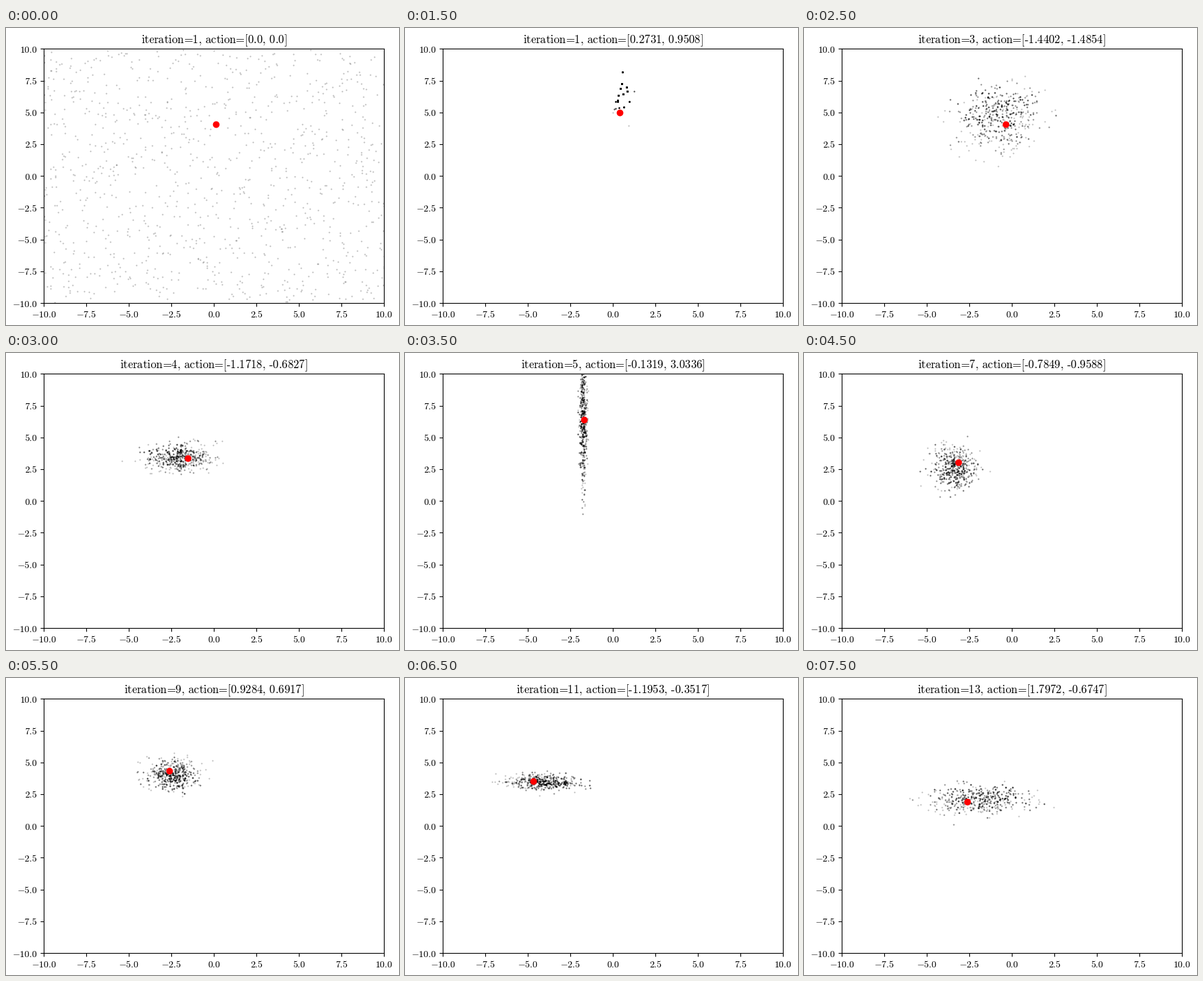
These frames come from a looping animation (573 px wide and 432 px high, 8000 ms). A matplotlib script:

```python
import numpy as np
import matplotlib.pyplot as plt
from matplotlib.animation import FuncAnimation

plt.rcParams["mathtext.fontset"] = "cm"

W, H, DPI = 573, 432, 100
STEP_MS, HOLD = 500, 3  # the opening picture holds for three steps
N = 1000
START = np.array([0.1, 4.05])

# Commanded moves, shown in the title
ACTIONS = np.array([
    (0.2731, 0.9508), (0.6712, 0.5341), (-1.4402, -1.4854), (-1.1718, -0.6827),
    (-0.1319, 3.0336), (-0.6694, -2.3976), (-0.7849, -0.9588), (-0.4316, 0.6143),
    (0.9284, 0.6917), (-0.8463, -0.4935), (-1.1953, -0.3517), (0.2486, -0.9324),
    (1.7972, -0.6747),
])
path = START + np.vstack([(0, 0), np.cumsum(ACTIONS, axis=0)])


def particles(step):
    """Motion noise scales with the action; resampling favours one side."""
    rng = np.random.default_rng(step + 3)
    if step == 0:
        return rng.uniform(-10, 10, (N, 2))
    # Few of the uniform particles survive the first measurement
    size, scale, radius = (32, 1.9, 0.45) if step == 1 else (500, 1, 1.6)
    angle = np.radians(28 * step + 40)
    side = np.array([np.cos(angle), np.sin(angle)])
    pool = rng.normal(0, 0.92, (size, 2))
    d2 = ((pool - 0.8 * side) ** 2).sum(axis=1)
    weight = np.exp(-d2 / (2 * radius ** 2))
    picked = pool[rng.choice(size, N, p=weight / weight.sum())]
    return path[step] + scale * np.abs(ACTIONS[step - 1]) * (picked + 0.35 * side)


def title_text(step):
    action = "0.0, 0.0" if step == 0 else "{:.4f}, {:.4f}".format(*ACTIONS[step - 1])
    return rf"$\text{{iteration={max(step, 1)}, action=[{action}]}}$"


fig = plt.figure(figsize=(W / DPI, H / DPI), dpi=DPI)
ax = fig.add_axes([55.4 / W, 32 / H, 496 / W, 369.6 / H])
ax.set(xlim=(-10, 10), ylim=(-10, 10))
for axis in (ax.xaxis, ax.yaxis):
    axis.set_major_locator(plt.MultipleLocator(2.5))
    axis.set_major_formatter(lambda v, _: rf"$\mathrm{{{v:.1f}}}$")
dots, = ax.plot([], [], "k.", ms=1, alpha=0.28)
robot, = ax.plot([], [], "ro", ms=6)
title = ax.set_title("")


def draw(frame):
    step = max(0, frame - HOLD + 1)
    dots.set_data(*particles(step).T)
    robot.set_data(*path[step].reshape(2, 1))
    title.set_text(title_text(step))
    return dots, robot, title


anim = FuncAnimation(fig, draw, frames=len(ACTIONS) + HOLD, interval=STEP_MS,
                     repeat=True, repeat_delay=0)
plt.show()
```
